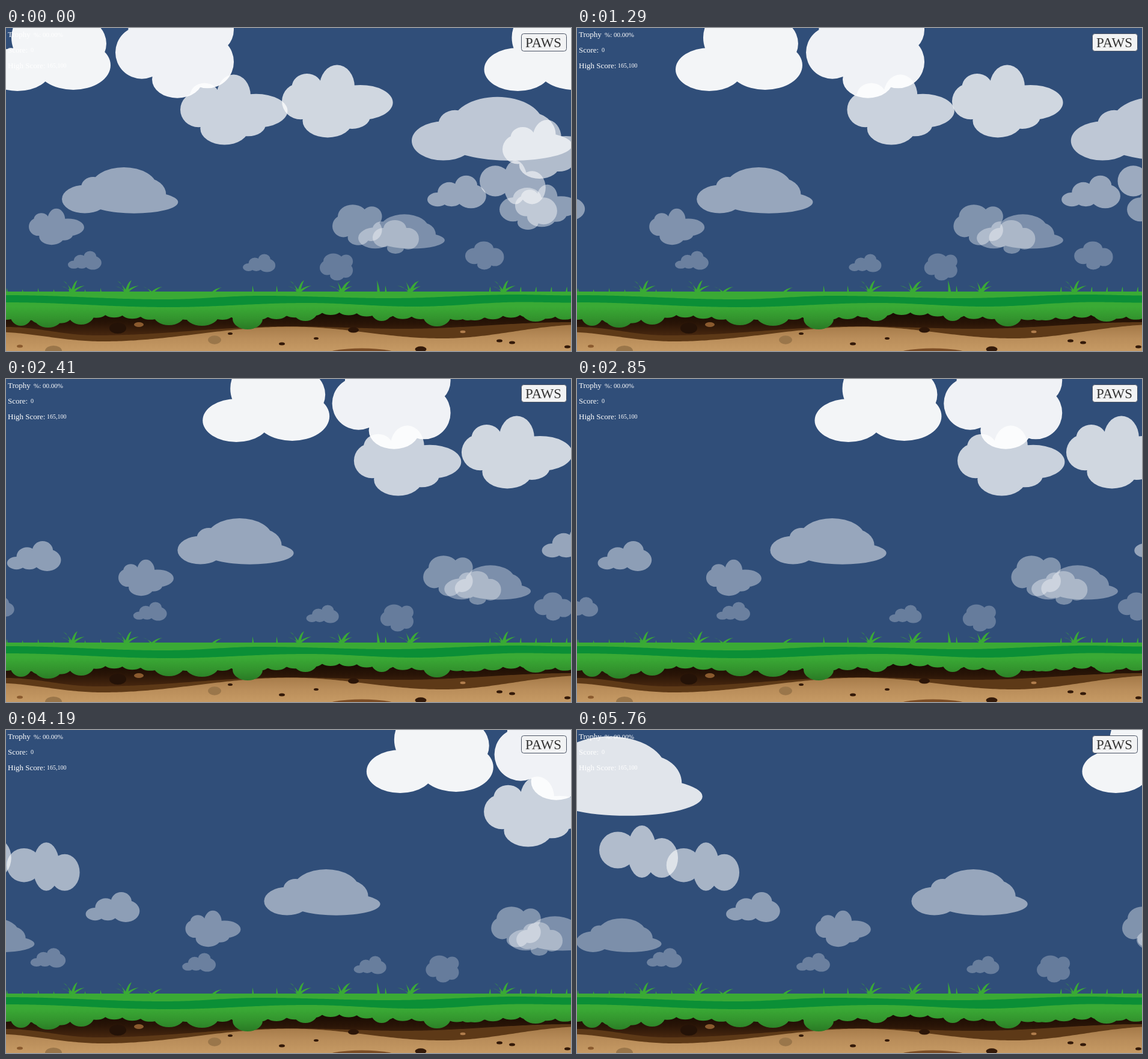
Animation, 940 px wide and 538 px high, one loop 5.86 s. Source, as an HTML page with a canvas:

```html
<!DOCTYPE html>
<html lang="en">
<head>
<meta charset="utf-8">
<title>Drifting clouds</title>
<style>
  html, body { margin: 0; width: 100%; height: 100%; overflow: hidden; background: #304e79; }
  canvas, svg { position: absolute; left: 0; top: 0; width: 940px; height: 538px; }
  text { font-family: "Liberation Serif", "Times New Roman", serif; }
  .hud { fill: #fff; font-size: 13px; }
  .num { font-size: 10px; }
  .pct { font-size: 11px; }
</style>
</head>
<body>
<canvas id="stage" width="940" height="538"></canvas>
<svg viewBox="0 0 940 538">
  <g class="hud">
    <text x="3" y="15">Trophy</text><text class="pct" x="46" y="15">%: 00.00%</text>
    <text x="3" y="41">Score:</text><text class="num" x="41" y="40">0</text>
    <text x="3" y="67">High Score:</text><text class="num" x="68" y="66">165,100</text>
  </g>
  <rect x="857.5" y="9.5" width="75" height="29" rx="4" fill="#f2f3f4" stroke="#4a5364"/>
  <text x="864" y="31.5" font-size="23" fill="#333">PAWS</text>
</svg>
<script>
const W = 940, H = 538, LOOP = 5860, SKY = '#304e79';
const ctx = document.getElementById('stage').getContext('2d');

// Cloud outlines: drawn size, width when nearest, ellipses as x, y, rx, ry.
const shapes = {
  hill: { w: 193, h: 77, full: 366, parts: [[38, 53, 38, 23.5], [103, 33.5, 55, 33.5],
    [52, 33, 20, 17], [140, 45, 33, 27], [120, 58, 73, 18.7]] },
  bloom: { w: 177, h: 116, full: 225, parts: [[30, 58, 30, 29], [40, 35, 24, 21], [88, 35, 28, 35],
    [125, 60, 52, 28], [73, 89, 40, 27], [112, 82, 29, 20], [82, 60, 38, 32]] },
  puff: { w: 211, h: 148, full: 211, parts: [[56, 112, 56, 36], [149, 105, 62, 41],
    [94, 59, 48, 50], [160, 69, 44, 42], [110, 88, 50, 38]] },
  blob: { w: 83, h: 68, full: 199, parts: [[18.5, 36, 18.5, 18.5], [34, 20, 25, 20],
    [66, 20, 17, 17], [64.5, 42.6, 18.5, 18.5], [43.4, 55, 17.7, 13], [43, 36, 25, 22]] },
  knot: { w: 77, h: 56, full: 205, parts: [[18, 29, 18, 16], [37, 14, 19, 14], [59, 31, 18, 18],
    [38, 46.5, 14, 9.5], [42, 28, 22, 20]] },
  climb: { w: 97, h: 54, full: 187, parts: [[17, 39.5, 17, 11.5], [36, 28, 19, 17],
    [64, 17, 18.5, 17], [72, 34, 25, 20], [40, 38, 18, 13]] },
  trio: { w: 131, h: 87, full: 198, parts: [[31, 41, 31, 30.5], [71, 43.5, 24, 43.5],
    [104, 54, 27, 33]] }
};

// Each cloud: shape, left edge at the start, height of its middle.
const clouds = [
  ['blob', 522, 398], ['climb', 394, 391.5], ['climb', 103, 387], ['climb', -159, 379.5],
  ['knot', 764, 379], ['knot', 610, 348], ['hill', -341, 342], ['hill', 586, 339],
  ['bloom', 38, 331], ['blob', 543, 328], ['knot', 821, 301], ['bloom', 847, 296],
  ['climb', -173, 295], ['climb', 701, 273], ['hill', 93, 270.5], ['trio', 788, 257],
  ['trio', -389, 227.5], ['trio', -544, 202.5], ['bloom', 826, 202], ['hill', 675, 168],
  ['bloom', 290, 136], ['bloom', 459, 122], ['hill', -922, 77], ['blob', 182, 36],
  ['puff', -37, 31], ['puff', 795.5, 31]
];

function oval(g, x, y, rx, ry) {
  g.moveTo(x + rx, y);
  g.ellipse(x, y, rx, ry, 0, 0, Math.PI * 2);
}

// Higher means nearer: larger, faster and more opaque.
function drawCloud([name, x, y], dist) {
  const s = shapes[name], near = 1.061 - y * .00197, k = s.full * near / s.w;
  ctx.save();
  ctx.translate(x + dist * near, y - s.h * k / 2);
  ctx.scale(k, k);
  ctx.fillStyle = `rgba(255,255,255,${near * .94})`;
  ctx.beginPath();
  for (const p of s.parts) oval(ctx, ...p);
  ctx.fill();
  ctx.restore();
}

// The picture steps every 50 ms, with a slightly longer rest between bursts.
const bursts = [30, 650, 1240, 1840, 2450, 3060, 3670, 4290, 4890, 5510];
function snap(t) {
  const from = bursts.filter(b => b <= t).pop();
  if (from === undefined) return 0;
  return Math.min(5760, from + 50 * Math.min(11, Math.floor((t - from) / 50)));
}

// Key points of time and distance at full speed.
const drift = [[0, 0], [1290, 201], [1890, 290], [2850, 432.5], [3570, 544.5], [4840, 740], [5760, 877.5]];

// Value at x between key points, straight or eased.
function between(pts, x, ease = u => u) {
  let i = 1;
  while (i < pts.length - 1 && x > pts[i][0]) i++;
  const [x0, y0] = pts[i - 1], [x1, y1] = pts[i];
  return y0 + (y1 - y0) * ease((x - x0) / (x1 - x0));
}
const smooth = u => (1 - Math.cos(Math.PI * u)) / 2;

function fade(g, y0, y1, ...colors) {
  const f = g.createLinearGradient(0, y0, 0, y1);
  colors.forEach((c, i) => f.addColorStop(i / (colors.length - 1), c));
  return f;
}

// Area between two edges, each a wave through key points.
function band(g, top, bottom, fill) {
  g.fillStyle = fill;
  g.beginPath();
  for (let x = 0; x <= W; x += 4) g.lineTo(x, between(top, x, smooth));
  for (let x = W; x >= 0; x -= 4) g.lineTo(x, between(bottom, x, smooth));
  g.fill();
}
const flat = y => [[0, y], [W, y]];

// A blade rises from its root and bends over to the tip.
function blade(g, x, dx, dy, w = 2.5) {
  const tx = x + dx, ty = 440 - dy;
  g.beginPath();
  g.moveTo(x - w, 441);
  g.quadraticCurveTo(x + dx * .3 - w * .5, ty + dy * .2, tx, ty);
  g.quadraticCurveTo(x + dx * .45 + w * .5, ty + dy * .35, x + w, 441);
  g.fill();
}

function drawGrass(g) {
  g.fillStyle = '#3aaa35';
  const tips = [[-15, 19], [-18, 10], [9, 20], [21, 11]];
  for (const x of [110, 200, 487, 827]) for (const [dx, dy] of tips) blade(g, x, dx, dy);
  for (const x of [558, 672]) for (const [dx, dy] of tips) blade(g, x, -dx, dy);
  for (const dx of [-15, 17]) blade(g, 243, dx, 9);
  blade(g, 344, 15, 8);
  blade(g, 620, -3, 20);
  for (const x of [411, 451, 632]) blade(g, x, -1, 11, 1.5);
  for (let i = 0; i < 7; i++) {
    blade(g, 2 + i * 26, -1, i % 2 ? 5 : 7, 1.2);
    blade(g, 805 + i * 25.5, 1, 9, 1.5);
  }
}

// Green hem hanging over the soil: small even humps and some larger bulges.
function drawHem(g) {
  const edge = [[0, 482], [70, 489], [165, 478], [250, 482], [420, 482], [545, 474], [680, 481],
    [780, 483], [855, 478], [940, 482]];
  band(g, flat(439), edge, fade(g, 464, 502, '#3aaa35', '#33952e', '#2a7a25'));
  g.beginPath();
  for (let x = 0; x < W; x += 30) oval(g, x, between(edge, x, smooth) - 7, 19, 11);
  const bulges = [[25, 18, 496], [70, 24, 499], [125, 22, 494], [271, 26, 495], [326, 28, 496],
    [402, 25, 502], [498, 21, 488], [625, 18, 488], [717, 23, 497], [768, 17, 487], [881, 24, 489]];
  for (const [x, r, low] of bulges) oval(g, x, low - 18, r, 18);
  g.fill();
}

function drawGround(g) {
  g.fillStyle = fade(g, 495, H, '#a47948', '#b98d5a', '#c69a64');
  g.fillRect(0, 490, W, 48);
  band(g, flat(470), [[-25, 506], [160, 522], [475, 497.5], [725, 517], [965, 494]], '#5d3917');
  band(g, flat(470), [[0, 498], [150, 512], [470, 497], [660, 501], [940, 490]],
    fade(g, 474, 512, '#180a02', '#2a1507', '#47270f'));

  const dark = '#341a09', rust = '#8a5a2e', pale = '#9a764a';
  const stones = [[186, 500, 14, '#241207'], [221, 494, 8, rust], [347, 519.5, 11, pale],
    [373, 509, 4, dark], [459, 526, 5, dark], [516, 517, 4, dark], [578, 503, 9, '#2b1508'],
    [690, 535, 9.5, dark], [760, 506, 4.5, '#b07d4c'], [821, 521, 5, dark], [842, 524, 5, dark],
    [934, 531, 5, dark], [23, 530, 5, rust], [79, 538, 14, pale]];
  for (const [x, y, r, color] of stones) {
    g.fillStyle = color;
    g.beginPath();
    oval(g, x, y, r, r * (r > 10 ? .65 : .5));
    g.fill();
  }
  g.fillStyle = '#7c4d25';
  g.beginPath();
  oval(g, 592, 545, 62, 11.5);
  g.fill();

  drawHem(g);
  band(g, [[0, 445], [265, 452], [425, 446], [640, 450], [850, 444], [940, 445.5]],
    [[0, 457], [270, 465], [500, 458], [680, 464], [860, 456.5], [940, 457.5]], '#0b8f36');
  drawGrass(g);
}

const ground = document.createElement('canvas');
ground.width = W;
ground.height = H;
drawGround(ground.getContext('2d'));

function draw(t) {
  const dist = between(drift, snap(t));
  ctx.fillStyle = SKY;
  ctx.fillRect(0, 0, W, H);
  for (const c of clouds) drawCloud(c, dist);
  ctx.drawImage(ground, 0, 0);
}

const start = performance.now();
function loop() {
  draw((performance.now() - start) % LOOP);
  requestAnimationFrame(loop);
}
loop();
</script>
</body>
</html>
```
